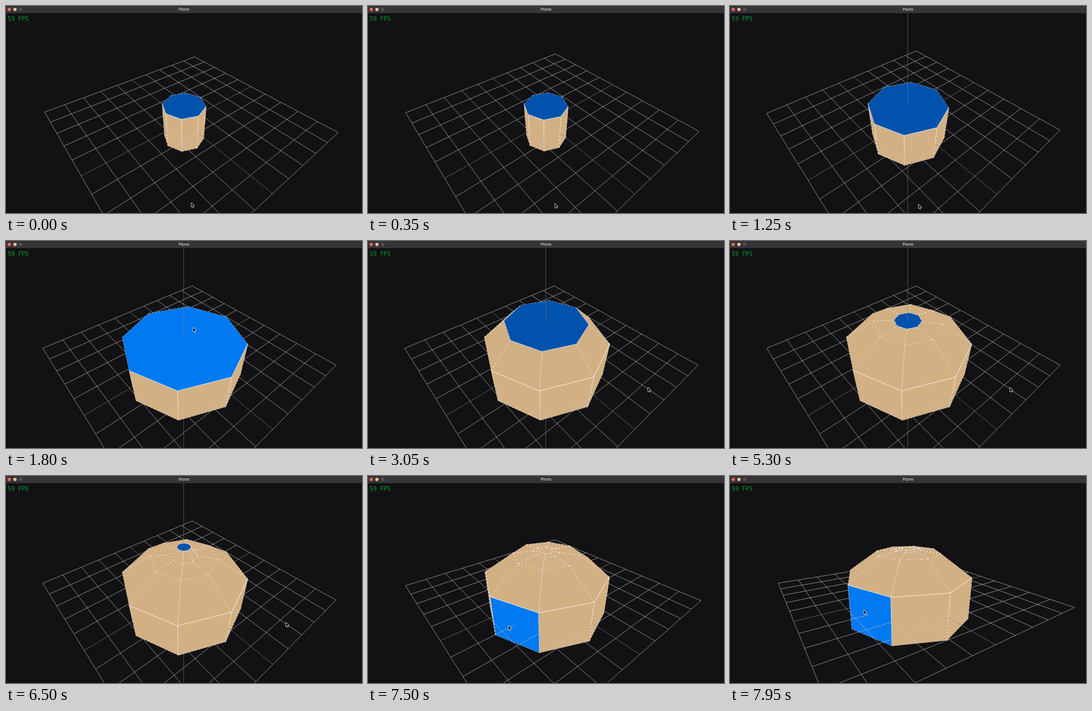
Animation, 600 px wide and 349 px high, one loop 8 s. Source, as an HTML page with a canvas:

```html
<!DOCTYPE html>
<html lang="en">
<head>
<meta charset="utf-8">
<title>Plorm</title>
<style>
  html, body { margin: 0; width: 100%; height: 100%; overflow: hidden; background: #121113; }
  canvas { display: block; }
</style>
</head>
<body>
<canvas id="stage" width="600" height="349"></canvas>
<script>
const ctx = document.getElementById('stage').getContext('2d');
const LOOP = 8000, BAR = 12, CX = 300, CY = 180.5;
const FOCAL = 406.8, DISTANCE = 11.25, TARGET_Y = 0.54, SIDES = 8;
const BEIGE = '#d3b083', SELECTED = '#0052ac', HOVER = '#0079f1';

const clamp01 = x => Math.max(0, Math.min(1, x));
const linear = (t, t0, t1, a, b) => a + (b - a) * clamp01((t - t0) / (t1 - t0));
const geometric = (t, t0, t1, a, b) => a * (b / a) ** clamp01((t - t0) / (t1 - t0));

// Piecewise linear track of [time, ...values]
function track(t, keys) {
  let i = 0;
  while (i < keys.length - 2 && t > keys[i + 1][0]) i++;
  const [t0, ...a] = keys[i], [t1, ...b] = keys[i + 1];
  return a.map((v, n) => linear(t, t0, t1, v, b[n]));
}

// Pitch and yaw in degrees
const ORBIT = [[0, 38.7, 6.1], [700, 42.2, 4.7], [7050, 42.2, 4.7], [7650, 27, 5.5], [7950, 19.5, 12.3]];
const POINTER = [
  [0, 312, 331.5], [700, 317.5, 334], [1560, 317.5, 334], [1760, 315, 145.5], [2000, 315, 145.5],
  [2450, 471.5, 246.5], [6850, 471.5, 246.5], [7050, 240, 285], [7650, 235, 241], [7950, 225, 225.5]
];

function makeCamera(t) {
  const [pitch, yaw] = track(t, ORBIT).map(d => d * Math.PI / 180);
  const sin = Math.sin(pitch), cos = Math.cos(pitch);
  // Point in polar form: angle is measured clockwise from the far grid corner
  return (radius, angle, height) => {
    const u = radius * Math.sin(angle + yaw), v = radius * Math.cos(angle + yaw);
    const y = height - TARGET_Y;
    const scale = FOCAL / (DISTANCE + v * cos - y * sin);
    return [CX + u * scale, CY - (v * sin + y * cos) * scale];
  };
}

function getRings(t) {
  const base = geometric(t, 850, 1540, 1, 2.85);
  const rings = [{ y: -1, r: base }, { y: 1, r: base }];
  if (t >= 2700) rings.push({ y: 2, r: geometric(t, 2750, 3190, 2.85, 1.463) });
  if (t >= 3600) rings.push({ y: linear(t, 4350, 5050, 3, 2.11), r: geometric(t, 3650, 4240, 1.463, 0.59) });
  if (t >= 5350) rings.push({ y: linear(t, 6050, 6800, 3.11, 2.155), r: geometric(t, 5400, 5850, 0.59, 0.295) });
  return rings;
}

function fillPath(points, color) {
  ctx.beginPath();
  points.forEach(p => ctx.lineTo(...p));
  ctx.closePath();
  ctx.fillStyle = color;
  ctx.fill();
}

function line(a, b, color, width, dash = []) {
  ctx.beginPath();
  ctx.moveTo(...a);
  ctx.lineTo(...b);
  ctx.setLineDash(dash);
  ctx.strokeStyle = color;
  ctx.lineWidth = width;
  ctx.stroke();
}

const edge = (a, b, solid) =>
  line(a, b, solid ? 'rgba(255,255,255,.85)' : 'rgba(255,255,255,.7)', 0.7, solid ? [] : [3.5, 2]);

const isFront = k => k >= 2 && k <= 4;

function isFacing(points) {
  return points.reduce((area, [x, y], i) => {
    const [nx, ny] = points[(i + 1) % points.length];
    return area + x * ny - nx * y;
  }, 0) > 0;
}

const ringPoints = (project, { y, r }) =>
  Array.from({ length: SIDES }, (_, k) => project(r, k * Math.PI / 4, y));

function drawBand(lower, upper, style) {
  const faces = lower.map((p, k) => {
    const n = (k + 1) % SIDES;
    return { k, n, points: [p, lower[n], upper[n], upper[k]] };
  }).filter(face => isFacing(face.points));
  for (const { k, points } of faces) fillPath(points, style.hovered && k === 4 ? HOVER : BEIGE);
  for (const { k, n } of faces) {
    if (!style.cut) edge(lower[k], lower[n], style.solidLower && isFront(k));
    edge(upper[k], upper[n], style.solidUpper && isFront(k));
    edge(lower[k], upper[k], k === 4);
    if (n !== 4) edge(lower[n], upper[n], false);
  }
}

function drawGrid(project) {
  const at = (x, z) => project(Math.hypot(x, z), Math.atan2(z, x) - Math.PI / 4, 0);
  for (let i = -5; i <= 5; i++) {
    const color = i ? '#bfbfbf' : '#808080';
    line(at(i, -5), at(i, 5), color, 0.65);
    line(at(-5, i), at(5, i), color, 0.65);
  }
}

function drawSolid(t, project) {
  const rings = getRings(t), last = rings.length - 1;
  const outlines = rings.map(ring => ringPoints(project, ring));
  const showAxis = t >= 800 && t < 7000;
  const axis = (y0, y1) => line([299.5, y0], [299.5, y1], 'rgba(130,130,130,.5)', 1);
  const body = { hovered: t >= 7400, solidUpper: true };

  if (showAxis) axis(project(0, 0, -1)[1], 349);
  // The part below the ground plane shows through the grid
  drawBand(outlines[0], outlines[1], body);
  drawGrid(project);
  drawBand(ringPoints(project, { y: 0, r: rings[0].r }), outlines[1], { ...body, cut: true });

  for (let i = 1; i < last; i++) {
    drawBand(outlines[i], outlines[i + 1], { solidLower: i === 1, solidUpper: i + 1 === last });
  }
  const cap = outlines[last];
  const capColor = t >= 7000 ? BEIGE : t >= 1700 && t < 2000 ? HOVER : SELECTED;
  fillPath(cap, capColor);
  cap.forEach((p, k) => edge(p, cap[(k + 1) % SIDES], isFront(k) && t < 7000));
  if (showAxis) axis(BAR, project(0, 0, rings[last].y)[1]);
}

function drawPointer([x, y]) {
  ctx.save();
  ctx.translate(x, y);
  ctx.setLineDash([]);
  ctx.lineJoin = 'round';
  ctx.strokeStyle = '#e8e8e8';
  ctx.lineWidth = 1.4;
  ctx.beginPath();
  [[0.5, 0.7], [0.5, 7], [1.9, 5.8], [2.9, 8], [3.9, 7.6], [3, 5.4], [4.9, 5.2]].forEach(p => ctx.lineTo(...p));
  ctx.closePath();
  ctx.stroke();
  ctx.fillStyle = '#000';
  ctx.fill();
  ctx.restore();
}

function drawWindow() {
  ctx.fillStyle = '#373437';
  ctx.fillRect(0, 0, 600, BAR);
  ['#f0645c', '#e9c199', '#555155'].forEach((color, i) => {
    ctx.beginPath();
    ctx.arc(5.5 + i * 9.6, 5.7, 2.8, 0, 2 * Math.PI);
    ctx.fillStyle = color;
    ctx.fill();
  });
  ctx.fillStyle = '#bebbbe';
  ctx.font = 'bold 6.3px Inter, sans-serif';
  ctx.textAlign = 'center';
  ctx.fillText('Plorm', CX, 8);
  ctx.fillStyle = '#009e2f';
  ctx.font = '9.7px "DejaVu Sans Mono", monospace';
  ctx.textAlign = 'left';
  ctx.fillText('59 FPS', 3, 24.7);
}

function render(now) {
  const t = now % LOOP;
  ctx.fillStyle = '#121113';
  ctx.fillRect(0, 0, 600, 349);
  drawSolid(t, makeCamera(t));
  drawWindow();
  drawPointer(track(t, POINTER));
}

let start;
function tick(now) {
  start ??= now;
  render(now - start);
  requestAnimationFrame(tick);
}
render(0);
requestAnimationFrame(tick);
</script>
</body>
</html>
```
